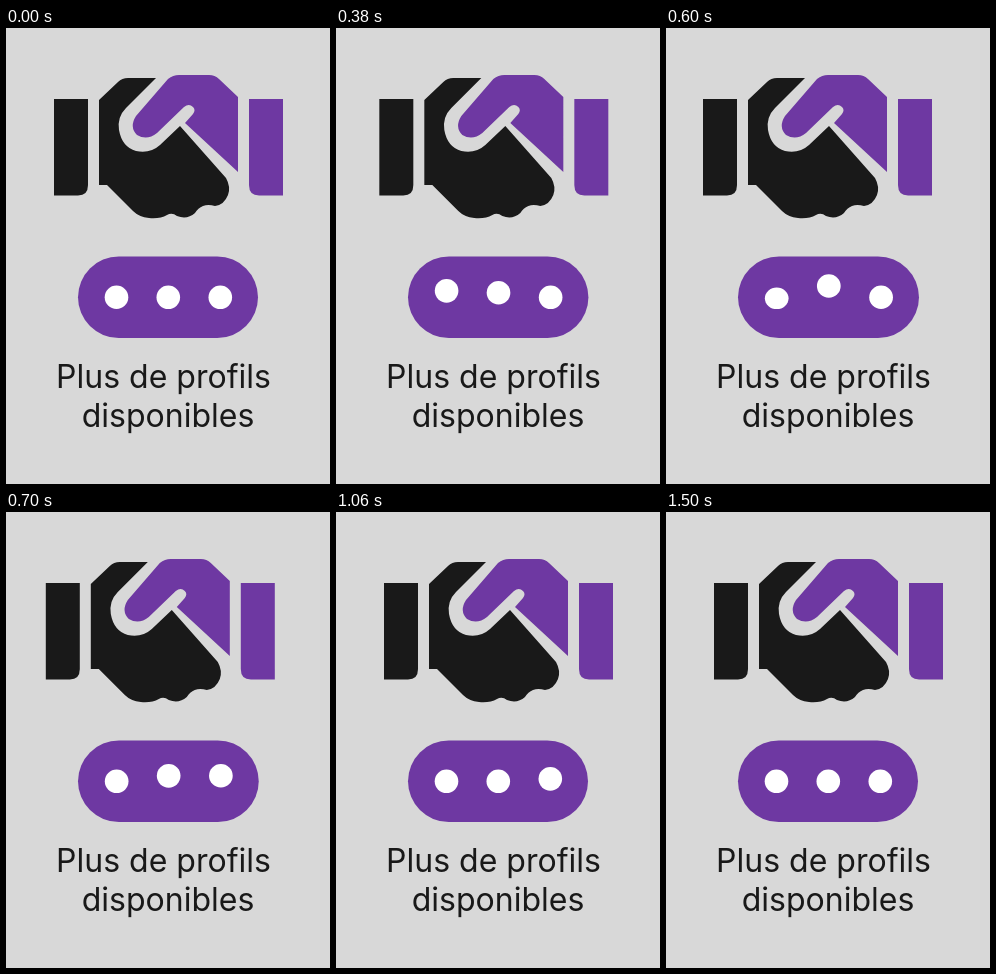
Write an HTML page that moves like this. It is 324 px wide and 456 px high and loops after 1520 ms.

```html
<!DOCTYPE html>
<html lang="fr">
<head>
<meta charset="utf-8">
<style>
  html, body { margin: 0; width: 100%; height: 100%; overflow: hidden; background: #d8d8d8; }
  svg { display: block; width: 100%; height: 100%; }
  text { font: 32px Inter, sans-serif; fill: #191919; text-anchor: middle; }
  .dark { fill: #191919; }
  .violet { fill: #6e38a2; }
</style>
</head>
<body>
<svg viewBox="0 0 324 456">
  <g id="hands">
    <g class="dark">
      <path d="M48 71H82V157Q82 167.500 72 167.500H48Z"/>
      <path d="M93 72L112 54Q116 50 122 50H150L120 80Q111 89 113 102Q116 119 130 123Q144 126 154 117L174 98L220 150
        Q225 159 222 167Q218 177 209 178Q202 176 197 178Q192 180 189 185Q181 192 171 188Q166 184 161 187Q154 191 143 190
        Q133 189 127 183L101 157H93Z"/>
    </g>
    <g class="violet">
      <path d="M243 71H277V167.500H253Q243 167.500 243 157Z"/>
      <path d="M173 47H203Q209 47 213 51L232 69V144L179 95L187 86Q190 82 187 79Q183 75 178 79L151 105
        Q141 113 131 107Q123 99 130 88L162 51Q167 47 173 47Z"/>
    </g>
  </g>
  <g id="pill">
    <rect class="violet" x="72" y="228.500" width="180" height="81.500" rx="40.750"/>
    <g fill="#fff">
      <ellipse class="dot" cx="110.500" rx="11.800"/>
      <ellipse class="dot" cx="162.300" rx="11.800"/>
      <ellipse class="dot" cx="214.300" rx="11.800"/>
    </g>
  </g>
  <text x="157.500" y="360">Plus de profils</text>
  <text x="162" y="399">disponibles</text>
</svg>
<script>
const LOOP = 1520, STAGGER = 300;
const hands = document.getElementById('hands');
const pill = document.getElementById('pill');
const dots = document.querySelectorAll('.dot');

// [time after the dot's start, height]
const hop = [[0, 0], [80, 4.5], [160, 8.5], [220, 10.7], [290, 12], [380, 6.5], [460, 2.5], [520, 0.4], [600, -1], [680, 0]];

const ease = p => (1 - Math.cos(Math.PI * Math.min(1, Math.max(0, p)))) / 2;

function height(t) {
  const i = hop.findIndex(([time]) => time > t);
  if (i < 1) return 0;
  const [t0, h0] = hop[i - 1], [t1, h1] = hop[i];
  return h0 + (h1 - h0) * (t - t0) / (t1 - t0);
}

function draw(now) {
  const t = now % LOOP;
  const pull = t < 600 ? ease((t - 200) / 400) : ease((900 - t) / 300);
  hands.setAttribute('transform', `translate(${-11 * pull})`);
  pill.setAttribute('transform', `translate(72) scale(${1 + 0.0055 * pull} 1) translate(-72)`);
  dots.forEach((dot, i) => {
    const h = height(t - i * STAGGER);
    dot.setAttribute('cy', 269.3 - h);
    dot.setAttribute('ry', 11.8 + Math.min(0, h));
  });
}

const start = performance.now();
function frame() {
  draw(performance.now() - start);
  requestAnimationFrame(frame);
}
draw(0);
requestAnimationFrame(frame);
</script>
</body>
</html>
```
